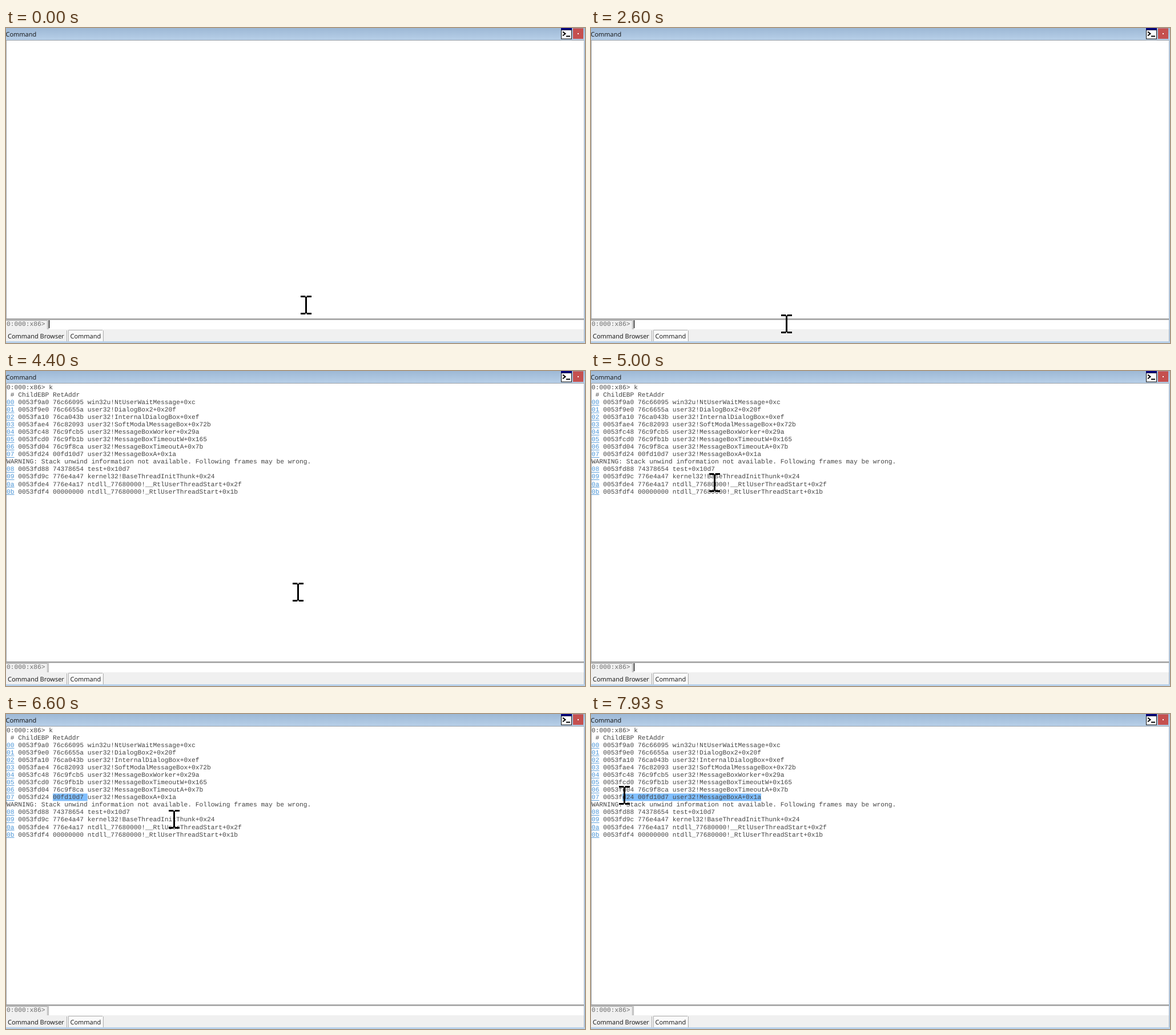
Write an HTML page that moves like this. It is 1014 px wide and 552 px high and loops after 8000 ms.

```html
<!DOCTYPE html>
<html lang="en">
<head>
<meta charset="utf-8">
<title>Command</title>
<style>
  html, body { margin: 0; width: 100%; height: 100%; overflow: hidden; background: #f0f0f0; }
  svg { display: block; width: 1014px; height: 552px; }
  text { white-space: pre; text-rendering: geometricPrecision; }
  .ui { font: 11px "Open Sans", "Noto Sans", sans-serif; fill: #111; }
  .mono { font: 11.25px "Liberation Mono", "Courier New", monospace; fill: #444; }
  .prompt { fill: #6a6a6a; }
  .link { fill: #4a94d6; }
</style>
</head>
<body>
<svg viewBox="0 0 1014 552">
  <defs>
    <linearGradient id="bar" x1="0" y1="0" x2="0" y2="1">
      <stop offset="0" stop-color="#9db8d5"/>
      <stop offset="1" stop-color="#b7cfe8"/>
    </linearGradient>
  </defs>

  <!-- title bar -->
  <rect width="1014" height="552" fill="#b9d1ea"/>
  <rect width="1014" height="21" fill="url(#bar)"/>
  <text class="ui" x="-0.5" y="14.5">Command</text>
  <rect x="972" width="19" height="19.5" fill="#111"/>
  <rect x="973" y="4" width="17" height="14.5" fill="#fff"/>
  <rect x="972" width="19" height="3.5" fill="#00007c"/>
  <path d="M975 6.5l4.5 3.5-4.5 3.5M981 14.5h7" fill="none" stroke="#000" stroke-width="2"/>
  <rect x="993" y="0.5" width="18" height="18.5" fill="#c5504f"/>
  <rect x="1001" y="9" width="2" height="2" fill="#fff"/>

  <!-- output pane -->
  <rect y="21" width="1012" height="489" fill="#fff"/>
  <path d="M0 21.5H1012M.5 21V510" stroke="#9a9fa5"/>
  <path d="M1012.5 21V549" stroke="#a3b3c4"/>
  <rect id="selection" y="139.4" height="13" fill="#80bfff"/>
  <g id="output"></g>

  <!-- input row and tabs -->
  <rect y="509" width="1012" height="40" fill="#f0f0f0"/>
  <rect y="509" width="1012" height="2.5" fill="#a0a0a0"/>
  <rect x="75" y="512" width="937" height="16" fill="#fff"/>
  <path d="M0 512.5H72M72.5 512V528M74.5 512V528" stroke="#a6a6a6"/>
  <text class="mono prompt" x="1" y="522">0:000:x86&gt;</text>
  <text class="mono" id="input" x="76" y="522"></text>
  <rect x="110" y="530" width="59" height="19" fill="#fafafa"/>
  <path d="M106.5 530V549M109.5 549V529.5H169M170.5 530V549" fill="none" stroke="#b0b0b0"/>
  <text class="ui" x="3" y="544">Command Browser</text>
  <text class="ui" x="112.5" y="543.5">Command</text>

  <rect id="caret" width="1.2" fill="#111"/>
  <path id="pointer" d="M-9.5-16.5h8.5v3h-8.5zM1-16.5h8.5v3H1zM-1.5-14.5h3v29h-3zM-9.5 13.5h8.5v3h-8.5zM1 13.5h8.5v3H1z"/>
</svg>
<script>
const LOOP = 8000, RATE = 15;
const LEFT = 1, CHAR = 6.75, BASE = 32, ROW = 13.04;
const NS = "http://www.w3.org/2000/svg";
const $ = id => document.getElementById(id);

const lines = [
  "0:000:x86> k",
  " # ChildEBP RetAddr",
  "00 0053f9a0 76c66095 win32u!NtUserWaitMessage+0xc",
  "01 0053f9e0 76c6655a user32!DialogBox2+0x20f",
  "02 0053fa10 76ca043b user32!InternalDialogBox+0xef",
  "03 0053fae4 76c82093 user32!SoftModalMessageBox+0x72b",
  "04 0053fc48 76c9fcb5 user32!MessageBoxWorker+0x29a",
  "05 0053fcd0 76c9fb1b user32!MessageBoxTimeoutW+0x165",
  "06 0053fd04 76c9f8ca user32!MessageBoxTimeoutA+0x7b",
  "07 0053fd24 00fd10d7 user32!MessageBoxA+0x1a",
  "WARNING: Stack unwind information not available. Following frames may be wrong.",
  "08 0053fd88 74378654 test+0x10d7",
  "09 0053fd9c 776e4a47 kernel32!BaseThreadInitThunk+0x24",
  "0a 0053fde4 776e4a17 ntdll_77680000!__RtlUserThreadStart+0x2f",
  "0b 0053fdf4 00000000 ntdll_77680000!_RtlUserThreadStart+0x1b"
];

// Pointer path: tick, x, y in whole pixels
const path = [
  [0, 525, 485], [16, 525, 485], [19, 419, 491],
  [33, 419, 491], [37, 345, 526], [39, 342, 518],
  [44, 342, 518], [48, 521, 389], [49, 511, 387],
  [68, 511, 387], [78, 127, 142], [81, 121, 150],
  [87, 121, 150], [92, 322, 194], [94, 313, 194],
  [96, 313, 194], [99, 294, 184], [103, 309, 147], [105, 310, 151],
  [109, 310, 151], [113, 163, 145], [119, 58, 142], [120, 58, 142]
];

function add(parent, tag, attrs, content = "") {
  const el = document.createElementNS(NS, tag);
  set(el, attrs);
  el.textContent = content;
  return parent.appendChild(el);
}

function set(el, attrs) {
  for (const key in attrs) el.setAttribute(key, attrs[key]);
}

const show = (el, on) => el.setAttribute("visibility", on ? "visible" : "hidden");
const colX = col => LEFT + col * CHAR;

const rows = lines.map((line, i) => {
  const row = add($("output"), "g", {});
  const y = BASE + i * ROW;
  const linked = /^0[0-9a-f] /.test(line);
  if (linked) {
    add(row, "text", { class: "mono link", x: LEFT, y }, line.slice(0, 2));
    add(row, "rect", { x: LEFT, y: y + 1.6, width: 2 * CHAR, height: 0.9, fill: "#4a94d6" });
  }
  const skip = linked ? 3 : 0;
  add(row, "text", { class: "mono", x: colX(skip), y }, line.slice(skip));
  return row;
});

// Slope at a key, flat at turning points so that holds stay still
function tangent(i, axis) {
  if (i === 0 || i === path.length - 1) return 0;
  const slope = j => (path[j + 1][axis] - path[j][axis]) / (path[j + 1][0] - path[j][0]);
  const a = slope(i - 1), b = slope(i);
  return a * b <= 0 ? 0 : 2 * a * b / (a + b);
}

function pointerAt(tick, axis) {
  let i = 0;
  while (i < path.length - 2 && path[i + 1][0] <= tick) i++;
  const span = path[i + 1][0] - path[i][0];
  const s = (tick - path[i][0]) / span, r = 1 - s;
  const ease = s * s * (3 - 2 * s);
  return path[i][axis] * (1 - ease) + path[i + 1][axis] * ease
    + span * (s * r * r * tangent(i, axis) - s * s * r * tangent(i + 1, axis));
}

function selectionAt(tick) {
  if (tick >= 85 && tick < 105) return [12, 21];
  if (tick < 110) return null;
  // The highlight trails the pointer slightly
  const x = pointerAt(tick, 1);
  const trail = x + 0.13 * (pointerAt(tick - 1, 1) - x);
  return [Math.min(44, Math.round((trail - 1.5) / CHAR)), 44];
}

function caretAt(tick) {
  const input = x => ({ x, y: 512, height: 14 });
  const output = col => ({ x: colX(col), y: 139.4, height: 13 });
  if (tick < 50) return input(75);
  if (tick < 56) return null;
  if (tick < 58) return input(tick === 56 ? 82.5 : 75);
  if (tick < 82) return Math.floor((tick - 58) / 8) % 2 ? null : input(75);
  if (tick < 85) return output(17);
  return tick >= 105 && tick < 110 ? output(44) : null;
}

function render(ms) {
  const tick = Math.min(119, Math.floor((ms + 4) * RATE / 1000));
  const count = tick < 57 ? 0 : tick < 58 ? 1 : rows.length;
  rows.forEach((row, i) => show(row, i < count));
  $("input").textContent = tick === 56 ? "k" : "";

  const range = selectionAt(tick);
  show($("selection"), range);
  if (range) set($("selection"), { x: colX(range[0]), width: (range[1] - range[0]) * CHAR });

  const caret = caretAt(tick);
  show($("caret"), caret);
  if (caret) set($("caret"), caret);

  const [x, y] = [1, 2].map(axis => Math.round(pointerAt(tick, axis)) + 0.5);
  set($("pointer"), { transform: `translate(${x} ${y})` });
}

const start = performance.now();
function loop() {
  render((performance.now() - start) % LOOP);
  requestAnimationFrame(loop);
}
render(0);
requestAnimationFrame(loop);
</script>
</body>
</html>
```
